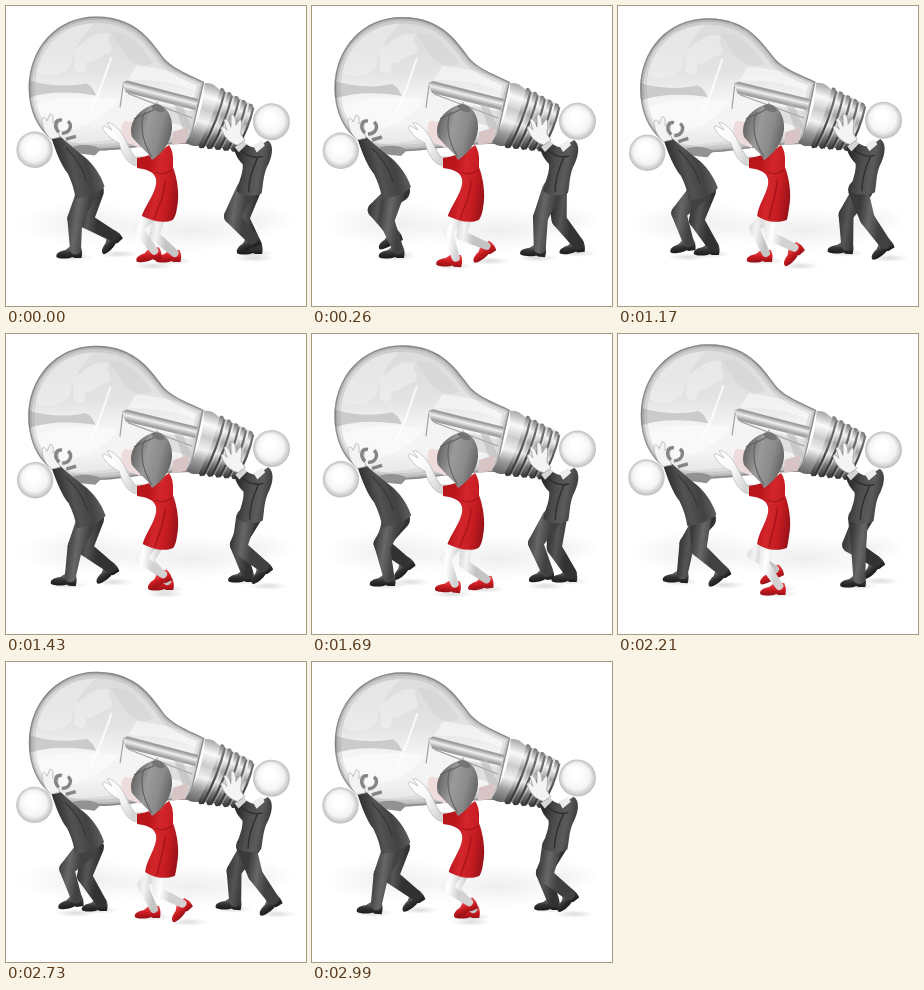
These frames come from a looping animation (300x300 px, 3.12 s). An HTML page with a canvas:

```html
<!DOCTYPE html>
<html lang="en">
<head>
<meta charset="utf-8">
<title>Carrying a light bulb</title>
<style>
html, body { margin: 0; width: 100%; height: 100%; overflow: hidden; background: #fff; }
canvas { display: block; width: 300px; height: 300px; }
</style>
</head>
<body>
<canvas id="stage"></canvas>
<script>
const canvas = document.getElementById('stage');
const ctx = canvas.getContext('2d');
const ratio = window.devicePixelRatio || 1;
canvas.width = canvas.height = 300 * ratio;

// Two walk cycles fit in one slow rocking of the load
const STEP = 130, STEPS = 24, CYCLE = 12;

// One stride, from heel strike: position along the stride, lift, heel pitch in degrees
const stride = [
  [.05, 0, -4], [.16, 0, 0], [.3, 0, 0], [.47, 0, 0], [.64, 0, 0], [.8, 0, 6],
  [.91, 0, 32], [1, 2, 42], [.74, 4, 38], [.47, 6, 24], [.2, 5, 8], [.02, 2, -5]
];

const suit = { near: ['#3a3a3a', '#676767', '#414141'], far: ['#303030', '#555', '#323232'] };
const skin = { near: ['#e2e2e2', '#fff', '#d2d2d2'], far: ['#d0d0d0', '#f4f4f4', '#c4c4c4'] };
const leather = ['#777', '#333', '#171717'];
const red = ['#e8474a', '#c91a20', '#8e1015'];

const walkers = {
  left: { hip: [84, 185], min: 55, span: 53, ground: [252, 249], plant: 11, bones: [30.5, 30.5], width: [11, 7.5, 5.5], cloth: suit, shoe: leather },
  woman: { hip: [152, 203], min: 135, span: 43, ground: [261, 256], plant: 2, bones: [27, 27], width: [7, 5, 4], cloth: skin, shoe: red },
  right: { hip: [242, 184], min: 220, span: 51, ground: [253, 248], plant: 3, bones: [30, 30], width: [10, 7.5, 6], cloth: suit, shoe: leather }
};

function linear(x1, y1, x2, y2, colors) {
  const g = ctx.createLinearGradient(x1, y1, x2, y2);
  colors.forEach((c, i) => g.addColorStop(i / (colors.length - 1), c));
  return g;
}

function shape(d, fill, line, width = 1) {
  const p = new Path2D(d);
  if (fill) { ctx.fillStyle = fill; ctx.fill(p); }
  if (line) { ctx.strokeStyle = line; ctx.lineWidth = width; ctx.stroke(p); }
}

function at(x, y, angle, draw) {
  ctx.save();
  ctx.translate(x, y);
  ctx.rotate(angle);
  draw();
  ctx.restore();
}

// Tilts the bulb and its carriers about a point near the screw base
function rock(i, draw) {
  const tilt = -.0125 * Math.sin((i - 2) / STEPS * 2 * Math.PI);
  at(187, 110, tilt, () => {
    ctx.translate(-187, -110);
    draw();
  });
}

function shadow(x, y, rx, ry, alpha) {
  at(x, y, 0, () => {
    ctx.scale(rx, ry);
    const g = ctx.createRadialGradient(0, 0, 0, 0, 0, 1);
    g.addColorStop(0, `rgba(90,90,90,${alpha})`);
    g.addColorStop(.5, `rgba(110,110,110,${alpha * .55})`);
    g.addColorStop(1, 'rgba(120,120,120,0)');
    ctx.fillStyle = g;
    ctx.fillRect(-1, -1, 2, 2);
  });
}

function head(x, y, r) {
  const g = ctx.createRadialGradient(x - 2, y - 4, r * .3, x, y, r);
  g.addColorStop(0, '#fff');
  g.addColorStop(.6, '#f4f4f4');
  g.addColorStop(1, '#bdbdbd');
  ctx.fillStyle = g;
  ctx.beginPath();
  ctx.arc(x, y, r, 0, 7);
  ctx.fill();
}

function taper(ax, ay, ra, bx, by, rb) {
  const a = Math.atan2(by - ay, bx - ax);
  ctx.beginPath();
  ctx.arc(ax, ay, ra, a + Math.PI / 2, a - Math.PI / 2);
  ctx.arc(bx, by, rb, a - Math.PI / 2, a + Math.PI / 2);
  ctx.closePath();
  ctx.fill();
}

// Knee of a two-bone leg, bending towards the walking direction
function kneeOf(hx, hy, fx, fy, thigh, calf) {
  const dx = fx - hx, dy = fy - hy, d = Math.hypot(dx, dy);
  const reach = Math.min(d, thigh + calf);
  const along = (reach * reach + thigh * thigh - calf * calf) / (2 * reach);
  const out = Math.sqrt(Math.max(0, thigh * thigh - along * along));
  return [hx + (dx * along - dy * out) / d, hy + (dy * along + dx * out) / d];
}

function leg(w, i, near) {
  const [u, lift, pitch] = stride[(i - w.plant + (near ? 0 : 6) + CYCLE) % CYCLE];
  const floor = w.ground[near ? 0 : 1];
  const a = -pitch * Math.PI / 180, c = Math.cos(a), s = Math.sin(a);
  const x = w.min + w.span * u;
  const y = floor - lift - 10 * Math.abs(s);
  const ax = x + 6 * c + 9 * s, ay = y + 6 * s - 9 * c;
  const hx = w.hip[0] + (near ? -2 : 3), hy = w.hip[1];
  const [kx, ky] = kneeOf(hx, hy, ax, ay, ...w.bones);

  shadow(x + 4, floor - 1, 20, 4, .22);
  at(x, y, a, () => shape('M-13 -1 C-14 -5 -9 -7 -4 -8 L1 -12 L11 -12 C13 -8 13 -4 12 0 L5 0 L3 -1 C-1 1 -11 1 -13 -1Z',
    linear(0, -11, 0, 1, w.shoe)));

  const [r1, r2, r3] = w.width;
  ctx.fillStyle = linear(kx - 9, ky, kx + 12, ky + 3, w.cloth[near ? 'near' : 'far']);
  taper(hx, hy, r1, kx, ky, r2);
  taper(kx, ky, r2, ax, ay, r3);
}

function legs(w, i) {
  leg(w, i, false);
  leg(w, i, true);
}

function glass() {
  const d = 'M198 76 C184 69 169 64 159 54 C146 38 132 11 90 11 C50 11 22.5 43 22.5 82 C22.5 118 44 144 78 145 C112 147 135 138 184 138Z';
  shape(d, linear(0, 11, 0, 146, ['#dcdcdc', '#dedede', '#e3e3e3', '#f4f4f4', '#f4f4f4', '#e2e2e2']));
  ctx.save();
  ctx.clip(new Path2D(d));
  shape('M22 75 C42 81 62 82 80 78 C86 81 88 86 90 90 C66 86 42 86 22 93Z', '#cbcbcb');
  shape('M36 42 C53 22 73 19 88 18 C76 29 67 43 64 62 C53 72 38 72 30 66Z', 'rgba(255,255,255,.25)');
  shape('M68 44 C80 36 88 24 104 29 C98 36 110 40 103 48 C95 47 90 58 79 57 C82 67 74 70 68 64Z', 'rgba(255,255,255,.3)');
  shape('M104 27 C122 24 136 42 147 57 C136 63 124 58 117 47Z', 'rgba(205,205,205,.4)');
  shape('M105 52 L94 84 L84 106', null, 'rgba(255,255,255,.8)', 2);
  shape('M28 100 C48 92 78 90 112 94 C100 114 70 126 43 127Z', 'rgba(255,255,255,.5)');
  shape('M130 60 C155 62 178 68 198 78 L196 88 C170 76 150 74 122 74Z', 'rgba(255,255,255,.5)');
  shape('M50 137 C80 142 120 128 185 127 L184 140 L80 148Z', 'rgba(170,170,170,.2)');
  shape(d, null, 'rgba(110,110,110,.14)', 13);
  shape(d, null, 'rgba(100,100,100,.2)', 7);
  shape(d, null, 'rgba(90,90,90,.5)', 3);
  ctx.restore();

  // Filament holder
  shape('M116 77 L121 75 L192 93 L189 104 L120 87Z', linear(152, 84, 149, 96, ['#999', '#f0f0f0', '#aaa', '#858585']));
  shape('M148 97 L190 106 L186 123 L146 111Z', 'rgba(215,215,215,.7)');
  shape('M122 88 L186 112 M151 96 L148 128 M117 79 L114 102', null, '#a2a2a2', 1.2);
  shape('M168 98 L175 97 L186 122 L178 126Z', 'rgba(180,180,180,.5)');
  shape('M167 126 L183 121 L180 137 L166 139Z', '#d8c4c4');
}

function base() {
  at(190, 107, .3, () => {
    shape('M-1 -31 C5 -34 10 -32 14 -30 L52 -25 L50 23 L13 30 C8 33 4 33 -1 31 C5 12 5 -12 -1 -31Z',
      linear(0, -32, 0, 32, ['#aaa', '#fafafa', '#ccc', '#f2f2f2', '#999', '#666']));
    for (let k = 0; k < 5; k++) {
      const x = 14 + k * 8, h = 31 - k * 1.6;
      shape(`M${x + 2} ${-h} Q${x + 5} ${-h - 2} ${x + 7} ${-h + 2} Q${x + 9} 0 ${x + 3} ${h} Q${x} ${h + 3} ${x - 2} ${h - 1} Q${x + 4} 0 ${x + 2} ${-h}Z`,
        linear(0, -h, 0, h, ['#777', '#f2f2f2', '#a4a4a4', '#e4e4e4', '#777', '#3c3c3c']));
      shape(`M${x + 7} ${-h + 2} Q${x + 9} 0 ${x + 3} ${h}`, null,
        linear(0, -h, 0, h, ['#777', '#656565', '#484848', '#333']), 2.2);
    }
  });
}

function leftTorso() {
  shape('M68 141 C78 139 88 139 95 144 L89 150 C82 149 76 149 70 147Z', '#929292');
  shape('M45 131 L53 130 C61 137 69 144 78 151 C87 158 95 169 99 181 C93 188 81 192 70 193 C69 185 66 176 62 168 C56 161 50 147 45 131Z',
    linear(54, 166, 94, 156, ['#303030', '#525252', '#424242', '#606060']));
  shape('M60 142 C68 150 77 161 81 176', null, '#363636', 1.2);
  shape('M45 134 C39 128 36 121 36 114 C37 111 40 112 41 116 L44 109 C48 109 47 114 47 118 L51 114 C54 116 51 122 52 126 L54 132Z',
    '#f3f3f3', '#b4b4b4', .8);
  shape('M53 127 C47 121 50 114 56 115 M56 128 C64 128 67 120 62 116 M60 134 L70 131', null, '#858585', 3.4);
  head(28.8, 144.8, 18.2);
}

function rightTorso() {
  shape('M262 134 C268 138 267 148 263 157 C257 168 258 178 256 187 C248 191 237 190 231 185 C233 176 238 166 237 158 C231 152 229 146 228 142 L236 134 C241 139 246 142 251 141Z',
    linear(231, 160, 265, 166, ['#2f2f2f', '#4d4d4d', '#5b5b5b', '#343434']));
  shape('M247 139 L256 134 L259 139 L251 146Z', '#eee');
  shape('M231 140 C239 148 246 153 257 150 M252 151 C246 164 243 175 243 186', null, '#2d2d2d', 1.4);
  shape('M229 141 L237 134 L241 138 L233 146Z', '#d6d6d6');
  shape('M232 139 C224 137 218 131 215 122 C216 119 219 121 221 124 L218 114 C220 111 223 115 225 121 L225 109 C228 107 230 112 230 119 L234 113 C237 114 235 123 235 128 L239 134Z',
    '#f4f4f4', '#a0a0a0', .8);
  head(265.5, 115.3, 18.5);
}

function woman(i) {
  legs(walkers.woman, i);
  const sway = -2.5 * Math.cos((i - 1) * Math.PI / 6);
  shape('M118 115 C113 122 116 132 122 137 L134 142 L136 117Z', '#eddcdb');
  shape('M134 160 C124 161 117 151 113 137 C106 134 99 128 96 121 C98 118 103 123 106 124 L101 117 C104 115 110 121 114 125 C120 133 123 144 129 151 L137 151Z',
    linear(102, 130, 132, 140, ['#fff', '#f6f6f6', '#d5d5d5']), '#bbb', .8);
  const l = 138 + sway, r = 168 + sway * .6;
  shape(`M131 152 C143 150 153 147 163 139 C168 146 167 154 167 161 C171 172 174 188 171 202 Q170 210 ${r} 214 C158 218 146 215 ${l} 210 C140 198 152 184 150 173 C148 165 139 163 131 162Z`,
    linear(140, 178, 174, 183, ['#b9161c', '#d3262b', '#c51c22', '#961217']));
  shape(`M150 166 C155 169 160 168 166 164 M159 174 C159 188 153 199 ${l + 12} 213`, null, 'rgba(115,5,12,.45)', 1.3);
  shape('M150 98 C160 99 167 110 166 123 C165 136 157 147 146 154 C143 147 134 141 126 131 C122 119 130 103 150 98Z',
    linear(127, 120, 167, 130, ['#6a6a6a', '#9a9a9a', '#8a8a8a', '#5e5e5e']));
  shape('M128 113 C136 109 144 106 153 101 M139 106 C133 117 136 136 146 151', null, '#626262', 1.2);
  shape('M145 100 C150 96 158 100 159 105 C155 108 148 105 145 100Z', '#747474');
}

function draw(i) {
  ctx.setTransform(ratio, 0, 0, ratio, 0, 0);
  ctx.fillStyle = '#fff';
  ctx.fillRect(0, 0, 300, 300);
  shadow(82, 218, 72, 22, .1);
  shadow(185, 224, 82, 22, .1);
  shadow(252, 214, 35, 16, .08);
  rock(i, () => {
    glass();
    base();
  });
  legs(walkers.left, i);
  legs(walkers.right, i);
  rock(i, () => {
    leftTorso();
    rightTorso();
  });
  woman(i);
}

let shown = -1;
const start = performance.now();
function tick() {
  const i = Math.floor((performance.now() - start) / STEP) % STEPS;
  if (i !== shown) draw(shown = i);
  requestAnimationFrame(tick);
}
tick();
</script>
</body>
</html>
```
